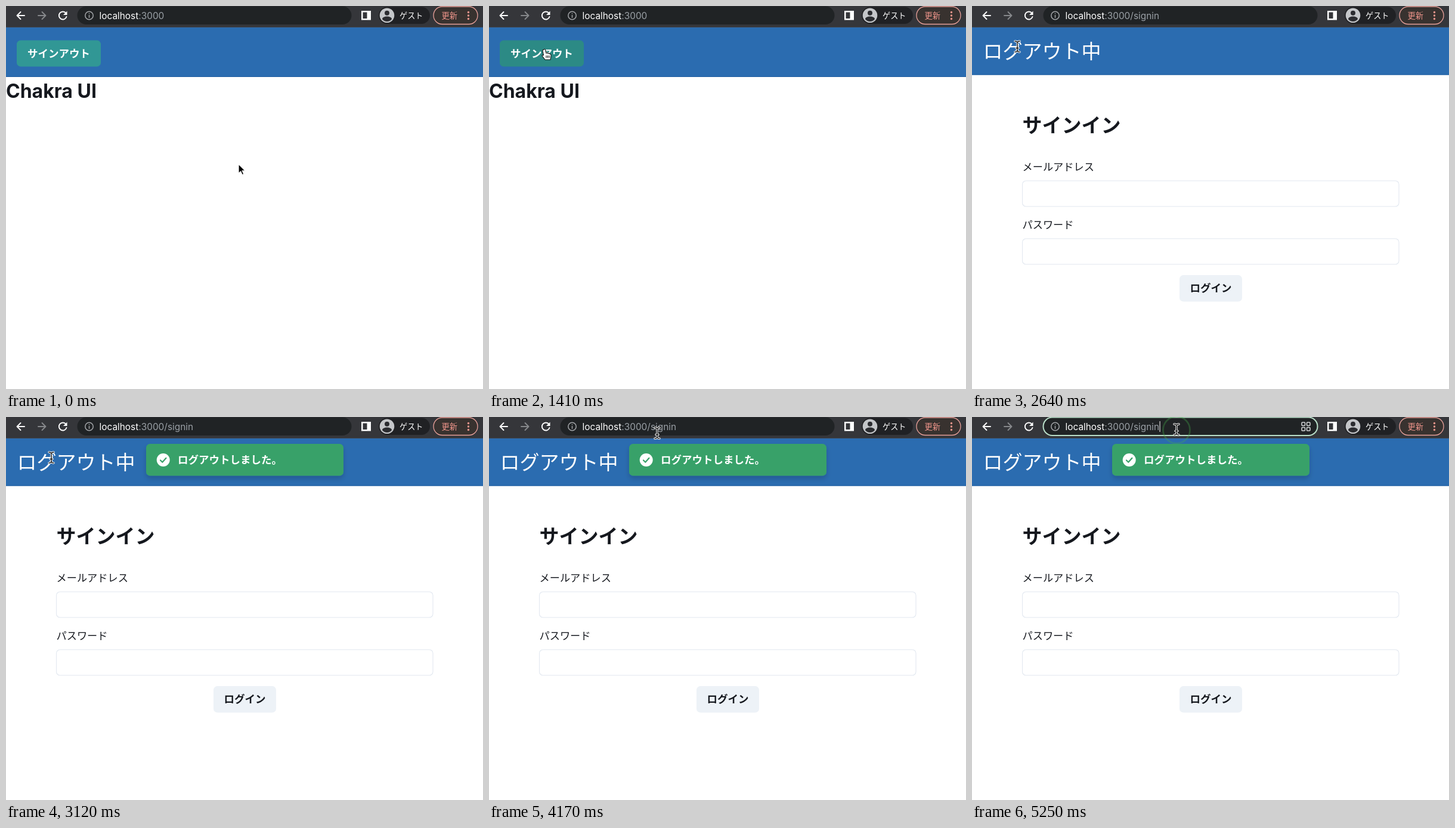
These frames come from a looping animation (800x642 px, 5280 ms). An HTML page:

```html
<!DOCTYPE html>
<html lang="ja">
<head>
<meta charset="utf-8">
<style>
  html, body { margin: 0; width: 100%; height: 100%; overflow: hidden; background: #fff; }
  svg { display: block; width: 800px; height: 642px; }
  text { font: 17.5px Inter, "Noto Sans CJK JP", "Noto Sans CJK", sans-serif; white-space: pre; }
  .b { font-weight: 700; }
  .h { font-size: 33px; }
  .w { fill: #fff; }
  .ink { fill: #15181e; }
  .line { fill: none; stroke-linecap: round; stroke-linejoin: round; }
</style>
</head>
<body>
<svg viewBox="0 0 800 642">
  <defs>
    <filter id="shadow" x="-10%" y="-30%" width="120%" height="180%">
      <feDropShadow dx="0" dy="5" stdDeviation="4" flood-opacity=".16"/>
    </filter>
  </defs>

  <g id="home">
    <rect y="36" width="800" height="83" fill="#2b6cb0"/>
    <rect y="118" width="800" height="1" fill="#1f5c9f"/>
    <rect id="button" x="18" y="57.5" width="141" height="44" rx="6.6"/>
    <text id="label" class="b w" x="36" y="86">サインアウト</text>
    <path id="spinner" class="line" d="M81.8 72.8A8.8 8.8 0 0 1 94.2 85.2" stroke="#fff" stroke-width="2.2"/>
    <text class="ink" x="0" y="153.5" font-weight="700" style="font-size:32px;font-weight:650">Chakra UI</text>
  </g>

  <g id="signin">
    <rect y="36" width="800" height="79.5" fill="#2b6cb0"/>
    <rect y="114.5" width="800" height="1" fill="#1f5c9f"/>
    <text class="h w" x="18.5" y="88" style="font-weight:500">ログアウト中</text>
    <text class="h b ink" x="84.5" y="211.5">サインイン</text>
    <text class="ink" x="84.5" y="276" style="font-size:17.2px;font-weight:300">メールアドレス</text>
    <text class="ink" x="84.5" y="373" style="font-size:17.2px;font-weight:300">パスワード</text>
    <g fill="#fff" stroke="#e2e8f0" stroke-width="1.1">
      <rect x="84.5" y="293" width="631.5" height="43" rx="6"/>
      <rect x="84.5" y="390" width="631.5" height="43" rx="6"/>
    </g>
    <rect x="348" y="451" width="105" height="44.5" rx="6.6" fill="#edf2f7"/>
    <text class="b ink" x="365.5" y="479">ログイン</text>
    <g id="toast">
      <rect x="235" y="45" width="331" height="53.5" rx="6.6" fill="#38a169" filter="url(#shadow)"/>
      <circle cx="263.7" cy="72" r="11" class="w"/>
      <path class="line" d="M259 72.5l3.3 3.3 6.2-7" stroke="#38a169" stroke-width="2.2"/>
      <text class="b w" x="288" y="78">ログアウトしました。</text>
    </g>
  </g>

  <rect width="800" height="36" fill="#35363a"/>
  <rect y="35" width="800" height="1" fill="#3d4652"/>
  <g class="line" stroke="#fff" stroke-width="1.9">
    <path d="M31 16H18.5M24.5 10l-6 6 6 6"/>
    <path stroke="#86888b" d="M54 16h12.500M60.500 10l6 6-6 6"/>
    <path d="M100.500 12A6.500 6.500 0 1 0 101.500 18"/>
  </g>
  <path class="w" d="M102.500 8.500v6.500H96z"/>
  <rect id="box" x="119.500" y=".5" width="460" height="30.500" rx="15.250" fill="#202325"/>
  <g class="line" stroke="#a2a5a8" stroke-width="1.500">
    <circle cx="139.500" cy="16" r="6.700"/>
    <path d="M139.500 15.500v3.700M139.500 12.600v.1"/>
  </g>
  <rect id="mark" y="6" height="20" fill="#7f9b8b"/>
  <text id="url" x="156.500" y="21.500" fill="#9aa0a6" style="font-size:15.400px"><tspan fill="#fff">localhost</tspan>:3000<tspan></tspan><tspan fill="#fff"></tspan><tspan></tspan></text>
  <rect id="caret" y="7" width="1" height="18" class="w"/>
  <g id="grid" fill="none" stroke="#d5d8da" stroke-width="1.500">
    <rect x="553" y="9" width="5.500" height="5.500" rx="1"/>
    <rect x="561.500" y="9" width="5.500" height="5.500" rx="1"/>
    <rect x="553" y="17.500" width="5.500" height="5.500" rx="1"/>
    <rect x="561.500" y="17.500" width="5.500" height="5.500" rx="1"/>
  </g>
  <path class="w" fill-rule="evenodd" d="M596 8h16v15.500h-16zM598.500 10.500v10.500h7v-10.500z"/>
  <rect x="625" y="1.500" width="86" height="28.500" rx="14.250" fill="#202124"/>
  <circle cx="639" cy="15.700" r="12.300" fill="#c4c6c9"/>
  <g fill="#2b2c30">
    <circle cx="639" cy="11.800" r="4"/>
    <path d="M631 22c0-6 16-6 16 0a10 10 0 0 1-16 0z"/>
  </g>
  <text class="w" x="660" y="21" style="font-size:13.200px;font-weight:500">ゲスト</text>
  <rect x="717" y="1" width="74" height="29.500" rx="14.750" fill="#38322f" stroke="#e8a099" stroke-width="1.300"/>
  <g fill="#f0968c">
    <text x="730.500" y="21" style="font-size:13.300px;font-weight:500">更新</text>
    <circle cx="775.500" cy="10.500" r="1.700"/>
    <circle cx="775.500" cy="16" r="1.700"/>
    <circle cx="775.500" cy="21.500" r="1.700"/>
  </g>

  <circle id="ring" fill="none" stroke="#45ad4b" stroke-width="2.700"/>
  <g id="pointer">
    <path id="arrow" d="M0 0V15.500L3.700 12.200 6.200 18 8.800 16.900 6.300 11.200H11.300Z" fill="#000" stroke="#fff" stroke-width="1.200"/>
    <path id="hand" d="M-1.500 1.500Q0-1 1.500 1.500L3 7Q5 5.500 6 7.500 8 6.500 9 8.500 11 8 11 11L10 18H1L-3.500 12Q-5 9.500-1.500 10.500L-3 3Q-3 1-1.500 1.500ZM3 11v4M5.500 11v4M8 11v4" fill="#fff" stroke="#111" stroke-width="1.100"/>
    <g id="beam" class="line">
      <path d="M-4-9Q0-9 0-6Q0-9 4-9M0-6V6M-4 9Q0 9 0 6Q0 9 4 9M-2 2.500H2" stroke="#fff" stroke-width="3.400"/>
      <path d="M-4-9Q0-9 0-6Q0-9 4-9M0-6V6M-4 9Q0 9 0 6Q0 9 4 9M-2 2.500H2" stroke="#111" stroke-width="1.400"/>
    </g>
  </g>
</svg>
<script>
const LOOP = 5280, STEP = 30;
const LOAD = 2310, PAGE = 2640, FOCUS = 4640, CLEAR = 5205;
// time, x, y
const route = [
  [0, 390, 265], [900, 390, 265], [1410, 93, 72], [1470, 92, 72], [1800, 76, 68],
  [3300, 76, 68], [4080, 282, 27], [4380, 282, 27], [4600, 278, 21],
  [FOCUS, 278, 21], [5120, 343, 21], [LOOP, 343, 21]
];
const presses = [[2220, 2440], [FOCUS, 5060], [CLEAR, LOOP]];

const $ = id => document.getElementById(id);
const clamp = v => Math.min(1, Math.max(0, v));
const smooth = v => v * v * (3 - 2 * v);
const mix = (a, b, k) => a + (b - a) * k;
const show = (id, on) => { $(id).style.display = on ? '' : 'none'; };
const set = (id, attrs) => { for (const k in attrs) $(id).setAttribute(k, attrs[k]); };
const blend = (a, b, k) => `rgb(${a.map((v, i) => Math.round(mix(v, b[i], k)))})`;

function position(t) {
  const i = route.findIndex(p => p[0] > t);
  const [t0, x0, y0] = route[i - 1], [t1, x1, y1] = route[i];
  const k = smooth((t - t0) / (t1 - t0));
  return [mix(x0, x1, k), mix(y0, y1, k)];
}

function drawAddress(t) {
  const url = $('url'), parts = url.querySelectorAll('tspan');
  const path = t < PAGE ? '' : '/signin';
  const focused = t >= FOCUS, edge = n => 156.5 + url.getSubStringLength(0, n);
  parts[1].textContent = path;
  parts[2].textContent = parts[3].textContent = '';
  let from = 16, to = 16;
  if (focused && t < CLEAR) {
    const x = position(t - 60)[0];
    while (to < 21 && (edge(to) + edge(to + 1)) / 2 < x) to++;
  }
  const selected = to > from;
  show('mark', selected);
  if (selected) set('mark', { x: edge(from), width: edge(to) - edge(from) });
  show('caret', t >= CLEAR);
  if (t >= CLEAR) set('caret', { x: edge(21) + 0.5 });
  if (selected) {
    parts[1].textContent = path.slice(0, 2);
    parts[2].textContent = path.slice(2, to - 14);
    parts[3].textContent = path.slice(to - 14);
  }
  show('grid', focused);
  set('box', { stroke: focused ? '#b9dfc9' : 'none', 'stroke-width': 2 });
}

function drawPages(t) {
  const loading = t >= LOAD;
  show('home', t < PAGE);
  show('signin', t >= PAGE);
  show('label', !loading);
  show('spinner', loading);
  const hover = clamp((t - 1290) / 120), press = clamp((t - 2220) / 120);
  const color = press ? blend([44, 138, 133], [42, 100, 102], press)
    : blend([49, 151, 149], [44, 138, 133], hover);
  set('button', { fill: color });
  set('spinner', { transform: `rotate(${(t - 2460) / 450 * 360} 88 79)` });
  const k = clamp((t - 2700) / 300), out = 1 - (1 - k) ** 3;
  set('toast', { opacity: out, transform: `translate(0 ${-24 * (1 - out)})` });
}

function drawPointer(t) {
  const [x, y] = position(t), [rx, ry] = position(Math.max(0, t - 48));
  const hand = t >= 1320 && t < LOAD, beam = t >= LOAD;
  show('arrow', !hand && !beam);
  show('hand', hand);
  show('beam', beam);
  set('pointer', { transform: `translate(${x} ${y})` });
  const force = Math.max(...presses.map(([down, up]) =>
    Math.min(clamp((t - down) / 90), clamp(1 - (t - up) / 200))));
  set('ring', { cx: rx, cy: ry + 0.7, r: 18 + 9 * force, opacity: 0.65 * force });
}

function frame(now) {
  const t = Math.floor(now % LOOP / STEP) * STEP;
  drawPages(t);
  drawAddress(t);
  drawPointer(t);
  requestAnimationFrame(frame);
}
requestAnimationFrame(() => frame(performance.now()));
</script>
</body>
</html>
```
